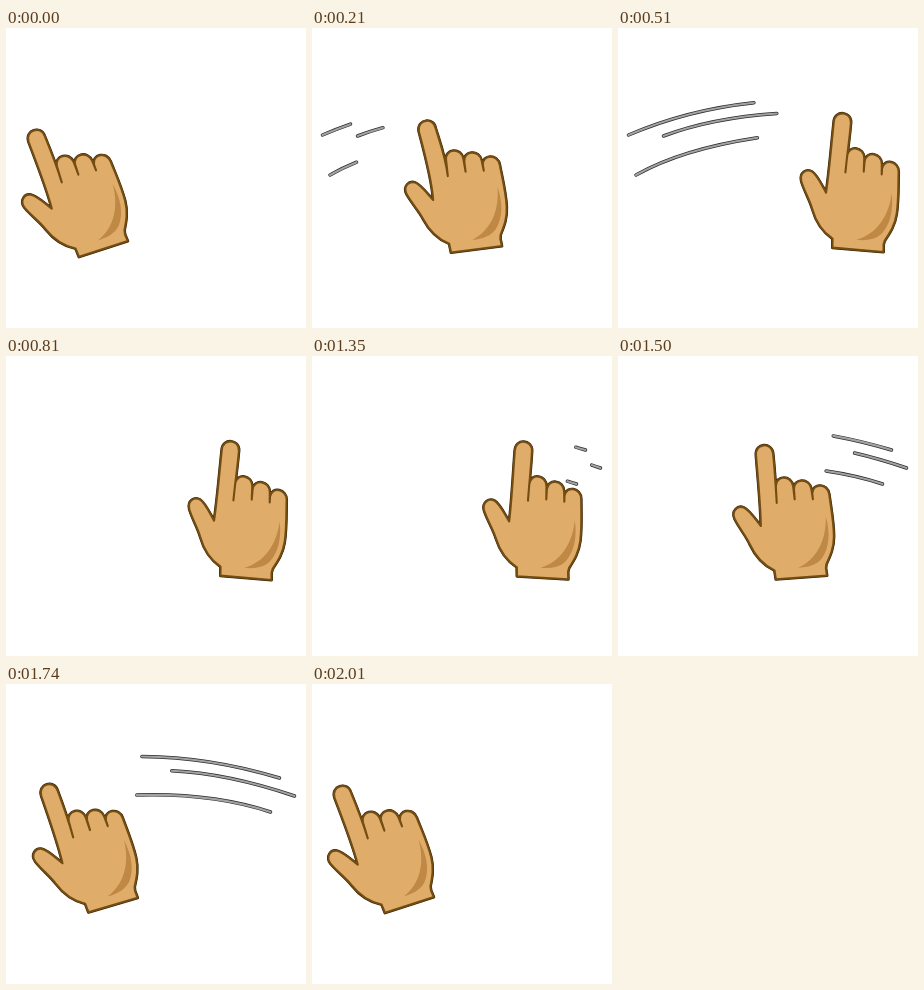
Write an HTML page that moves like this. It is 300 px wide and 300 px high and loops after 3.63 s.

```html
<!DOCTYPE html>
<html lang="en">
<head>
<meta charset="utf-8">
<title>Swipe gesture</title>
<style>
  html, body { margin: 0; width: 100%; height: 100%; overflow: hidden; background: #fff; }
  svg { display: block; width: 100%; height: 100%; }
  path { fill: none; stroke-linecap: round; stroke-linejoin: round; }
  .trail-edge { stroke: #2b2b2b; stroke-width: 3.5; }
  .trail-core { stroke: #a3a3a3; stroke-width: 2.1; }
  .hand-edge { stroke: #2f1f06; stroke-width: 3; }
  .hand-body { fill: #e0ac69; stroke: #744d13; stroke-width: 2.1; }
  .shade { fill: #bf8844; }
</style>
</head>
<body>
<svg viewBox="0 0 300 300">
  <g id="trails"></g>
  <g id="hand">
    <path class="hand-edge outline"/>
    <path class="hand-body outline"/>
    <path class="shade" d="M208 160C212.5 177 211.5 191 204 202C198 209 190 211 180 211.5C199 203 208.5 184 208 160Z"/>
  </g>
</svg>
<script>
const LOOP = 3630, STEP = 30;
const SWIPE = 450;             // hand travel, and time for a trail to grow
const BACK = 1320;             // start of the return swipe
const ERASE_DELAY = 420, ERASE = 270;

const hand = document.getElementById('hand');
const outlines = hand.querySelectorAll('.outline');
const clamp = x => Math.min(1, Math.max(0, x));

function addTrail(start, d) {
  const parts = ['trail-edge', 'trail-core'].map(name => {
    const path = document.createElementNS('http://www.w3.org/2000/svg', 'path');
    path.setAttribute('class', name);
    path.setAttribute('d', d);
    path.setAttribute('pathLength', 1);
    document.getElementById('trails').append(path);
    return path;
  });
  return { start, parts };
}

const trails = [
  addTrail(120, 'M10.5 107Q78 78 156 73'),
  addTrail(120, 'M45.5 108Q99.5 87.5 177 84.5'),
  addTrail(120, 'M18 147Q69 118 159 107'),
  addTrail(BACK, 'M273.5 94Q198.5 71.3 126 72.5'),
  addTrail(BACK, 'M288.5 112Q216 87.5 157 86.5'),
  addTrail(BACK, 'M264.5 128Q202 107.5 121 111.5')
];

// bend: how far the fingertip leans to the left
function handPath(bend) {
  const at = (x, y, k = 1) => `${x - bend * k} ${y + bend * k * 0.2} `;
  return 'M157.8 222.9L156.5 214C146 209 137 199 132 188C128 179 121 171 116.8 162' +
    'C113.5 154 120 148.5 126 151C131 153 137 162 143 169.5' +
    `C143 150 ${at(140, 122, 0.5)}${at(138, 99)}` +
    `C${at(137, 86.2)}${at(154, 85.7)}${at(155, 97)}` +
    `C${at(156.5, 110, 0.7)}158 128 159 146.5` +
    'L158.2 130C158 118.5 174 118.5 175.5 130L177 143' +
    'L176.3 133C176 121.5 192 121.5 193.7 133L195.2 143' +
    'L194.6 137C195 126.5 210 127 211.5 138' +
    'C213 150 216 166 216 180C216 192 212 200 208.3 208L207.8 212L208.9 219.3Z';
}

function draw(time) {
  const t = Math.floor(time / STEP) * STEP;
  const p = t < BACK ? clamp(t / SWIPE) : 1 - clamp((t - BACK) / SWIPE);
  const lag = t < BACK ? 5.5 * Math.sin(Math.PI * p) : 0;
  const bend = 1.4 - 3.2 * p + lag;

  hand.setAttribute('transform',
    `translate(${73 + 141 * p} ${230 - 9.3 * p}) rotate(${22.8 * p - 13.95}) translate(-157.5 -224)`);
  outlines.forEach(path => path.setAttribute('d', handPath(bend)));

  for (const { start, parts } of trails) {
    const head = clamp((t - start) / SWIPE);
    const tail = clamp((t - start - ERASE_DELAY) / ERASE);
    for (const path of parts) {
      path.style.display = head > tail ? '' : 'none';
      path.setAttribute('stroke-dasharray', `${head - tail} 2`);
      path.setAttribute('stroke-dashoffset', -tail);
    }
  }
}

const origin = performance.now();
function tick() {
  draw((performance.now() - origin) % LOOP);
  requestAnimationFrame(tick);
}
tick();
</script>
</body>
</html>
```
